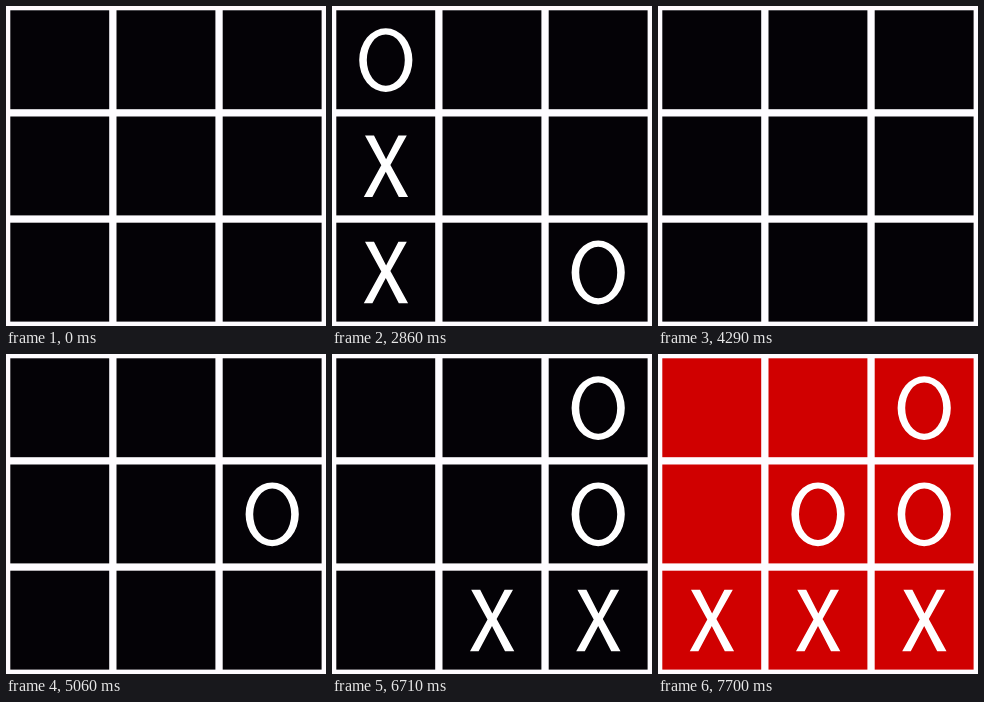
An HTML page with a canvas for the animation above (8 s loop, 320 by 320 pixels).

```html
<!DOCTYPE html>
<html lang="en">
<head>
<meta charset="utf-8">
<title>Noughts and crosses</title>
<style>
  html, body { margin: 0; width: 100%; height: 100%; overflow: hidden; background: #fefcff; }
  canvas { display: block; width: 100%; height: 100%; }
</style>
</head>
<body>
<canvas id="board" width="320" height="320"></canvas>
<script>
const ctx = document.getElementById('board').getContext('2d');
const LOOP = 8000;
const PITCH = 106.2, START = 4.3, SIZE = 98.9;
const BLACK = '#040206', GREEN = '#00d300', RED = '#d00000';

// Each game: start time, moves as [time, mark, column, row], and its winning colour.
const games = [
  { start: 0, win: 3630, color: GREEN, moves: [
    [770, 'O', 0, 0], [1430, 'X', 0, 2], [2090, 'O', 2, 2],
    [2860, 'X', 0, 1], [3630, 'O', 1, 1]] },
  { start: 4290, win: 7700, color: RED, moves: [
    [5060, 'O', 2, 1], [5610, 'X', 1, 2], [6160, 'O', 2, 0],
    [6710, 'X', 2, 2], [7150, 'O', 1, 1], [7700, 'X', 0, 2]] }
];

const cross = [
  [-20.8, -30.8], [-11.8, -30.8], [0.3, -7], [12.6, -30.8], [21, -30.8], [4.6, -1.4],
  [22.3, 30.8], [13, 30.8], [0, 5.5], [-13.4, 30.8], [-22, 30.8], [-4.5, -1]
];

function drawMark(mark, col, row) {
  const x = 53.8 + col * PITCH, y = 54.1 + row * PITCH;
  ctx.beginPath();
  if (mark === 'O') {
    ctx.ellipse(x, y, 26.6, 31.9, 0, 0, Math.PI * 2);
    ctx.closePath();
    ctx.moveTo(x + 19, y);
    ctx.ellipse(x, y, 19, 25.7, 0, 0, Math.PI * 2);
  } else {
    cross.forEach(([dx, dy]) => ctx.lineTo(x + dx, y + dy));
  }
  ctx.closePath();
  ctx.fill('evenodd');
}

function draw(t) {
  const game = t < games[1].start ? games[0] : games[1];
  ctx.fillStyle = '#fefcff';
  ctx.fillRect(0, 0, 320, 320);
  ctx.fillStyle = t >= game.win ? game.color : BLACK;
  for (let i = 0; i < 9; i++) {
    ctx.fillRect(START + (i % 3) * PITCH, START + Math.floor(i / 3) * PITCH, SIZE, SIZE);
  }
  ctx.fillStyle = '#fff';
  for (const [time, mark, col, row] of game.moves) {
    if (t >= time) drawMark(mark, col, row);
  }
}

const origin = performance.now();
function tick() {
  draw((performance.now() - origin) % LOOP);
  requestAnimationFrame(tick);
}
tick();
</script>
</body>
</html>
```
